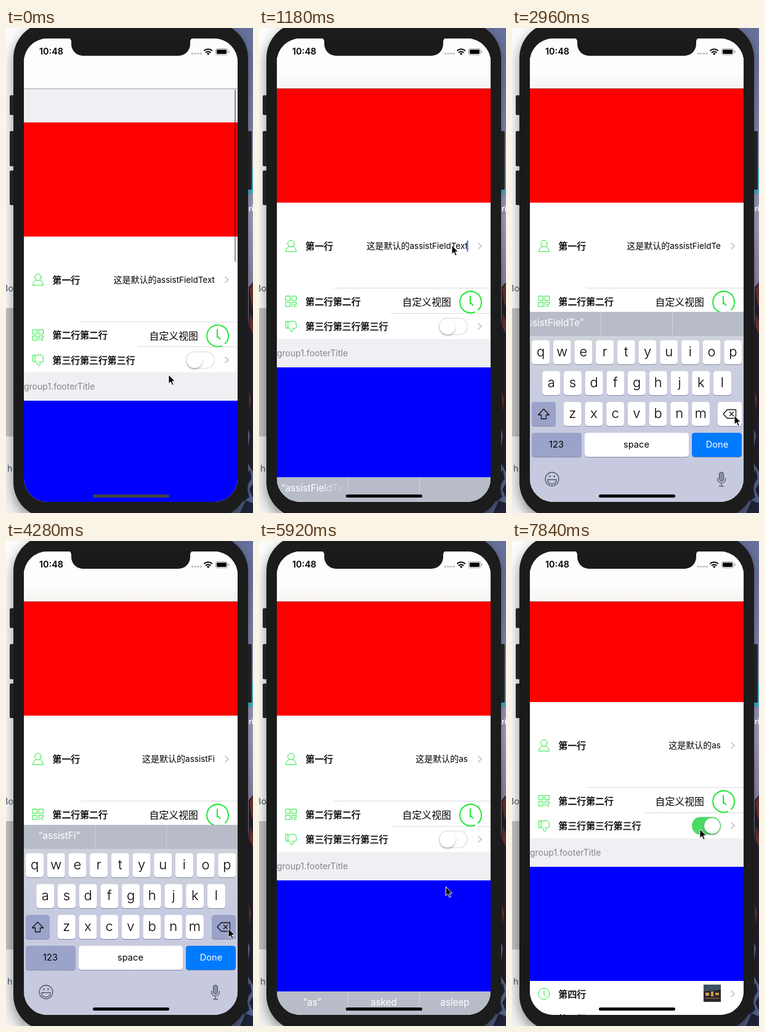
An HTML page that plays this animation: 401 px wide and 786 px high, repeating every 7990 ms.

```html
<!DOCTYPE html>
<html lang="zh">
<head>
<meta charset="utf-8">
<title>Form list</title>
<style>
  html, body { margin: 0; width: 100%; height: 100%; overflow: hidden; background: #fff; }
  svg { display: block; width: 100vw; height: 100vh; }
  text { font-family: Inter, "Noto Sans CJK SC", "Noto Sans CJK", sans-serif; white-space: pre; }
  .block { shape-rendering: crispEdges; }
  .label { font-size: 14.9px; stroke: #000; stroke-width: .4px; }
  .icon { fill: none; stroke: #21e837; stroke-width: 1; stroke-linejoin: round; stroke-linecap: round; }
  .chevron { fill: none; stroke: #c7c7cc; stroke-width: 1.8; }
  .key { text-anchor: middle; font-size: 22px; font-weight: 350; }
  .word { text-anchor: middle; font-size: 14.6px; }
  .glyph { fill: none; stroke: #111; stroke-width: 1.3; stroke-linejoin: round; }
  .hint { font-size: 15.2px; fill: #fff; }
</style>
</head>
<body>
<svg viewBox="0 0 401 786" preserveAspectRatio="none">
  <defs>
    <clipPath id="screen"><rect x="29" y="17" width="347" height="751" rx="38"/></clipPath>
    <clipPath id="hintCell"><rect x="30" y="460" width="114" height="39"/></clipPath>
    <linearGradient id="sky" x2="0" y2="1">
      <stop offset="0" stop-color="#66709a"/><stop offset=".2" stop-color="#858bb2"/>
      <stop offset=".4" stop-color="#aaa6c6"/><stop offset=".53" stop-color="#918ba9"/>
      <stop offset="1" stop-color="#56648c"/>
    </linearGradient>
    <linearGradient id="board" x2="0" y2="1">
      <stop offset="0" stop-color="#ced2da"/><stop offset=".28" stop-color="#c8cce0"/>
      <stop offset=".75" stop-color="#c6c9df"/><stop offset="1" stop-color="#d2d5dd"/>
    </linearGradient>
    <linearGradient id="navTint" x2="0" y2="1">
      <stop offset=".72" stop-color="#fdfdfd"/><stop offset=".85" stop-color="#f8f7f5"/>
    </linearGradient>
    <filter id="soft" x="-20%" y="-20%" width="140%" height="140%">
      <feDropShadow dx="0" dy="8" stdDeviation="10" flood-opacity=".45"/>
    </filter>
    <filter id="knobShade" x="-50%" y="-50%" width="200%" height="200%">
      <feDropShadow dx="0" dy="2" stdDeviation="1.4" flood-opacity=".3"/>
    </filter>
  </defs>

  <!-- desktop -->
  <rect width="401" height="786" fill="#fcfcfc"/>
  <rect y="454" width="30" height="208" fill="#c4c4c4"/>
  <rect y="662" width="30" height="124" fill="#f2f2f2"/>
  <rect x="340" width="61" height="786" fill="url(#sky)"/>
  <rect x="390" y="228" width="11" height="41" fill="#4fb4cd"/>
  <path d="M401 412L394 420V470L390 530V640L396 660L390 700L401 720Z" fill="#25202e"/>
  <path d="M401 414l-6 9 3 22 3 8zM396 462l5 14v20l-6-12zM394 588l4 14-3 20z" fill="#70362f"/>
  <path d="M391 722l5-6 3 14-8 12zM401 738l-6 10 6 14zM386 752l6-4 3 12-10 8zM401 770l-12-4-9 20h21z" fill="#1f2438"/>

  <!-- phone -->
  <g fill="#2a2a2b">
    <rect x="6" y="109" width="10" height="32" rx="2"/><rect x="6" y="167" width="10" height="57" rx="2"/>
    <rect x="6" y="231" width="10" height="56" rx="2"/><rect x="389" y="167" width="10" height="95" rx="2"/>
  </g>
  <rect x="12" y="-9" width="381" height="803" rx="58" fill="#1a1a1b" filter="url(#soft)"/>
  <g font-size="14.5">
    <text x="-6" y="427" fill="#3f4a55">Bo</text><text x="2" y="719" fill="#3f4a55">h</text>
    <text x="394" y="297" fill="#fff" font-size="12" font-weight="600">ri</text>
  </g>
  <rect x="12" y="60" width="17" height="660" fill="#1a1a1b"/>

  <g clip-path="url(#screen)">
    <g id="list"></g>
    <rect id="bar" x="371" width="2" rx="1"/>
    <rect x="29" y="17" width="347" height="81" fill="#fdfdfd"/>
    <rect id="nav" x="29" y="17" width="347" height="81" fill="url(#navTint)"/>
    <rect x="29" y="98" width="347" height="1" opacity=".34"/>

    <g id="keyboard"></g>
    <rect id="home" x="141" y="756" width="124" height="5" rx="2.5"/>

    <text x="54" y="43" font-size="14.4" font-weight="600">10:48</text>
    <g fill="#c4c4c6">
      <circle cx="302.5" cy="41.5" r="1.8"/><circle cx="307" cy="41.5" r="1.8"/>
      <circle cx="311.5" cy="41.5" r="1.8"/><circle cx="316" cy="41.5" r="1.8"/>
    </g>
    <g fill="none" stroke="#000" stroke-width="2">
      <path d="M321.5 37a9.5 9.5 0 0 1 13.3 0M324 40a6 6 0 0 1 8.3 0"/>
      <path d="M328.2 44l-2.3-2.5a3.4 3.4 0 0 1 4.6 0z" fill="#000" stroke="none"/>
      <rect x="340.5" y="33.5" width="19" height="10" rx="2.6" stroke="#999" stroke-width="1"/>
    </g>
    <rect x="342" y="35" width="16" height="7" rx="1.4"/><rect x="361" y="36.5" width="1.4" height="4" rx=".7" fill="#999"/>
    <path d="M100 16A6 6 0 0 1 106 22V26A19 19 0 0 0 125 45H280A19 19 0 0 0 299 26V22A6 6 0 0 1 305 16Z" fill="#1a1a1b"/>
  </g>

  <path id="cursor" d="M0 0V14.5L3.4 11.5L5.8 17L8.2 16L5.8 10.6H10.3Z" stroke="#fff" stroke-width="1"/>
</svg>

<script>
const $ = id => document.getElementById(id);
const set = (id, attrs) => { for (const name in attrs) $(id).setAttribute(name, attrs[name]); };
const clamp = v => Math.max(0, Math.min(1, v));

const LOOP = 7990, STEPS = 54, TYPED = 'assistFieldText';

// ---- list ----
const icons = {
  person: '<circle cx="52" cy="-4" r="5.3"/><path d="M49 .5Q44 3 43.5 9H60.5Q60 3 55 .5"/>',
  grid: '<path d="M43.5-8.500H50.500V-1.500H43.500ZM53.5-8.5H60.5V-1.5H53.5ZM43.5 1.5H50.5V8.5H43.5ZM53.5 8.5V1.5H60.5V5H57V8.5H60.5"/>',
  thumb: '<path d="M44-8H47V3H44ZM47-7Q52-9 58-8Q61-6 60.5 2Q60 4 54.5 3Q57 8 53 9Q51 9 51 6Q50 3 47 2"/>',
  clock: '<circle cx="52" r="9"/><path d="M52-5V1L55 4"/>'
};
const block = (x, y, height, fill) =>
  `<rect class="block" x="${x}" y="${y}" width="${376 - x}" height="${height}" fill="${fill}"/>`;
const row = (y, icon, label, extra = '', arrow = true) => `<g transform="translate(0 ${y})">
  <g class="icon">${icons[icon]}</g><text class="label" x="75.5" y="5.6">${label}</text>${extra}
  ${arrow ? '<path class="chevron" d="M355.5-5L361 0L355.5 5"/>' : ''}</g>`;

const field = `<text x="339" y="4.8" text-anchor="end" font-size="14">这是默认的<tspan id="typed"
  font-size="13.5"></tspan></text><rect id="caret" x="337.5" y="-9" width="2" height="18" fill="#3f62e0"/>`;
const custom = `<text x="232.5" y="7" font-size="15.9">自定义视图</text>
  <g class="icon" style="stroke-width:2"><path d="M350.1 17.6A17.5 17.5 0 1 1 355.9 13.8"/><path d="M343-8.5V2L347.5 6.5M343 2v2"/></g>`;
const toggle = `<rect id="track" x="292.7" y="-13.3" width="45.6" height="27" rx="13.5" stroke-width="1.5"/>
  <circle id="knob" cy=".3" r="12.8" fill="#fff" filter="url(#knobShade)"/>`;
const photo = `<rect x="311" y="-15" width="28" height="28" fill="#28282b"/>
  <path d="M311-15h28v8l-28 3z" fill="#3d5163"/><path d="M314-2h6v5h-6zM323-4h4v8h-4zM330-2h6v4h-6z" fill="#d09a48"/>
  <path d="M313 6h24v2h-24z" fill="#6d5234"/>`;

$('list').innerHTML = `
  ${block(29, 0, 910, '#efeff4')}
  ${block(29, 153, 185, '#f00')}
  ${block(29, 338, 220.2, '#fff')}
  ${block(121, 476, 1, '#dcdce0')}${block(214, 516.4, 1, '#dcdce0')}
  ${row(408, 'person', '第一行', field)}
  ${row(497.5, 'grid', '第二行第二行', custom, false)}
  ${row(538, 'thumb', '第三行第三行第三行', toggle)}
  <text x="29" y="586.3" font-size="14" fill="#85858a">group1.footerTitle</text>
  ${block(29, 604.4, 185, '#00f')}
  ${block(29, 789.4, 120, '#fff')}
  ${row(810.5, 'clock', '第四行', photo)}
  ${row(851, 'clock', '第五行')}`;

// ---- keyboard ----
const cap = (x, y, w, fill = '#fff', id = '') => `<rect x="${x}" y="${y + 1}" width="${w}" height="39" rx="4.5" fill="#858aa3"/>
  <rect ${id && `id="${id}"`} x="${x}" y="${y}" width="${w}" height="39" rx="4.5" fill="${fill}"/>`;
const letters = (chars, x, y) => [...chars].map((c, i) => {
  const left = x + i * 34.7;
  return cap(left, y, 29) + `<text class="key" x="${left + 14.5}" y="${y + 25.8}">${c}</text>`;
}).join('');
const word = (x, text, id = '') => `<text ${id && `id="${id}"`} class="word" x="${x}" y="680.3">${text}</text>`;
const DARK = '#9ba3ca', BLUE = '#007aff';

$('keyboard').innerHTML = `
  <rect x="29" y="499" width="347" height="340" fill="url(#board)"/>
  <rect x="29" y="460" width="347" height="39" fill="#b7bcc8"/>
  <path d="M144.5 460V499M260.5 460V499" stroke="#cdd1d9"/>
  <g clip-path="url(#hintCell)"><text id="hint0" class="hint" y="483"></text></g>
  <text id="hint1" class="hint" x="202.5" y="483" text-anchor="middle"></text>
  <text id="hint2" class="hint" x="318" y="483" text-anchor="middle"></text>
  ${letters('qwertyuiop', 32, 506)}${letters('asdfghjkl', 49.3, 556)}${letters('zxcvbnm', 83.7, 606)}
  ${cap(32, 606, 39, DARK)}${cap(334, 606, 39, DARK, 'erase')}
  ${cap(32, 656, 81, DARK)}${cap(118, 656, 169)}${cap(292, 656, 81, BLUE, 'done')}
  ${word(72, '123')}${word(202, 'space')}${word(333, 'Done', 'doneText')}
  <g class="glyph">
    <path d="M51.5 617.5L42.5 627H47.5V633.5H55.5V627H60.5Z"/>
    <path d="M343 625.5L349.5 618.5H363.5V632.5H349.5ZM353 622l7 7m0-7l-7 7"/>
    <g style="stroke:#555b66">
      <circle cx="65" cy="731" r="11"/><path d="M57.5 732H72.5A7.5 7 0 0 1 57.5 732Z"/>
      <path d="M61.5 725v3M68.5 725v3" stroke-width="2"/>
      <rect x="336.5" y="720" width="7" height="14" rx="3.5" fill="#8d92a2"/><path d="M333.5 729v2a6.5 6.5 0 0 0 13 0v-2M340 737.5V742M336 742.5h8"/>
    </g>
  </g>`;

// ---- motion: [step, value, ...] tracks, linear between points ----
function at(track, k, col = 1) {
  const i = track.findIndex(p => p[0] > k);
  if (i < 0) return track[track.length - 1][col];
  if (i === 0) return track[0][col];
  const a = track[i - 1], b = track[i];
  return a[col] + (b[col] - a[col]) * (k - a[0]) / (b[0] - a[0]);
}
const REST = 54.6;
const scrollTrack = [[0, 0], [1, 24], [2, 43], [3, 52], [4, REST], [42, REST], [45, 75.6], [46, 76.6]];
const boardTrack = [[7, 308], [8, 268], [9, 120], [10, 32], [11, 6], [12, 0], [37, 0], [38, 26], [39, 150], [40, 270], [41, 308]];
const mouseTrack = [[0, 264, 562], [2, 264, 562], [4, 285, 450], [6, 313, 352], [9, 313, 352], [12, 332, 628], [13, 335, 641],
  [16, 361, 628], [36, 361, 628], [37, 342, 645], [38, 342, 645], [41, 284, 518], [42, 281, 516], [45, 281, 494],
  [46, 281, 494], [47, 287, 474], [48, 287, 474], [50, 305, 467]];
const lengthTrack = [[17, 15], [28, 8], [29.5, 8], [36, 2]];
const switchTrack = [[50, 0], [51, .45], [52, .9], [53, 1]];
const barTrack = [[0, .42], [4, .42], [6, 0], [41, 0], [42, .42], [45, .42], [46, .2], [47, 0]];

const lengthAt = k => Math.round(at(lengthTrack, k));

// Letters fade in one after another.
const fadeIn = (text, front) => [...text].map((c, i) =>
  `<tspan fill-opacity="${clamp((front - i) / 5)}">${c}</tspan>`).join('');

function draw(k) {
  const scroll = at(scrollTrack, k), count = lengthAt(k), on = at(switchTrack, k);
  set('list', { transform: `translate(0 ${-scroll})` });
  set('bar', { y: 100 + Math.max(0, scroll - REST) * 12 / 22, height: 279 + Math.min(52, scroll), opacity: at(barTrack, k) });
  set('nav', { opacity: clamp(scroll / REST) });
  set('home', { fill: k < 6 ? '#444' : '#000' });
  set('cursor', { transform: `translate(${at(mouseTrack, k)} ${at(mouseTrack, k, 2)})` });

  $('typed').textContent = TYPED.slice(0, count);
  const blink = (k - (k < 20 ? 8 : 30) + 14) % 7 < 4;
  set('caret', { visibility: k > 6 && k < 39 && blink ? 'visible' : 'hidden' });

  const rise = at(boardTrack, k);
  set('keyboard', { transform: `translate(0 ${rise})`, visibility: rise < 308 ? 'visible' : 'hidden' });
  set('erase', { fill: count < lengthAt(k - 1) ? '#fff' : DARK });
  const pressed = k === 37;
  set('done', { fill: pressed ? '#fff' : BLUE });
  set('doneText', { fill: pressed ? '#000' : '#fff' });

  const long = count > 12;
  const gap = pressed ? '\u00a0\u00a0' : '';
  set('hint0', { x: long ? 36 - 26 * clamp((k - 10) / 3) : 86.5, 'text-anchor': long ? 'start' : 'middle' });
  $('hint0').innerHTML = fadeIn(`“${TYPED.slice(0, count)}${gap}”`, k < 20 ? 7 * (k - 6) : 99);
  const front = 7 * (k - 36);
  $('hint1').innerHTML = fadeIn('asked', front);
  $('hint2').innerHTML = fadeIn('asleep', front);

  set('track', { fill: on ? `rgba(76,217,100,${on})` : '#fff', stroke: on ? '#4cd964' : '#e3e3e5' });
  set('knob', { cx: 306 + 19 * on });
}

// The picture advances in even steps and holds between them;
// the small lead absorbs the 10 ms rounding of the step times.
const LEAD = 15;
const start = performance.now();
let last = -1;
function tick() {
  const time = (performance.now() - start) % LOOP;
  const k = Math.min(STEPS - 1, Math.floor((time + LEAD) / LOOP * STEPS));
  if (k !== last) draw(last = k);
  requestAnimationFrame(tick);
}
tick();
</script>
</body>
</html>
```
